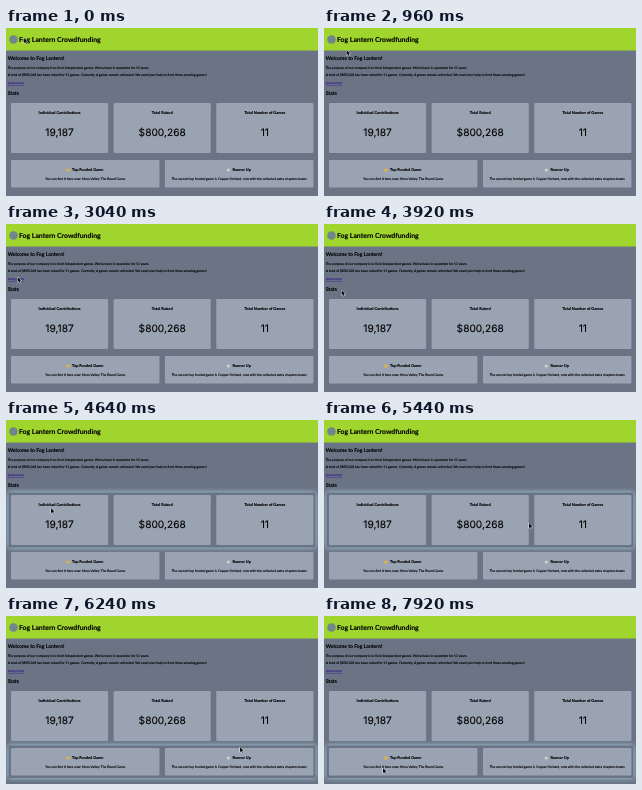
An HTML page that plays this animation: 312 by 168 pixels, repeating every 8000 ms.

```html
<!DOCTYPE html>
<html lang="en">
<head>
<meta charset="utf-8">
<title>Fog Lantern Crowdfunding</title>
<style>
html, body { margin: 0; width: 100%; height: 100%; overflow: hidden; background: #6a7485; }
svg { display: block; width: 100vw; height: 100vh; }
text {
  font-family: Lato, "Open Sans", sans-serif; font-size: 3.32px; text-rendering: geometricPrecision;
  fill: #000; stroke: #000; stroke-width: .12px;
}
.title { font-size: 6.88px; font-weight: 700; }
.h2 { font-size: 5.08px; font-weight: 700; }
.h3 { font-size: 3.92px; font-weight: 700; }
.num { font-family: Inter, sans-serif; font-size: 10.2px; }
.mid { text-anchor: middle; }
.link { fill: #3b1a90; stroke: #3b1a90; text-decoration: underline; }
.card { fill: #9aa3b2; }
.glow { fill: #add8e6; }
</style>
</head>
<body>
<svg viewBox="0 0 312 168">
  <defs>
    <filter id="blur" filterUnits="userSpaceOnUse" x="-12" y="50" width="336" height="130">
      <feGaussianBlur stdDeviation="2.6"/>
    </filter>
  </defs>
  <rect width="312" height="168" fill="#6a7485"/>
  <rect width="312" height="22.5" fill="#a0d52e"/>
  <circle cx="7.5" cy="11.5" r="4.3" fill="#71858c"/>
  <text class="title" x="13" y="13.8">Fog Lantern Crowdfunding</text>

  <text class="h2" x="1.7" y="31.9">Welcome to Fog Lantern!</text>
  <text x="1.7" y="41">The purpose of our company is to fund independent games. We've been in operation for 12 years.</text>
  <text x="1.7" y="48.3">A total of $800,268 has been raised for 11 games. Currently, 4 games remain unfunded. We need your help to fund these amazing games!</text>
  <text class="link" x="1.7" y="56">Learn more</text>
  <text class="h2" x="1.7" y="66.5">Stats</text>

  <g id="rows"></g>
  <path id="cursor" d="M0 0V5.2L1.2 4.1L2 6L2.9 5.6L2.1 3.8H3.7Z" fill="#08090b" stroke="#fff"
    stroke-width=".9" stroke-linejoin="round" paint-order="stroke"/>
</svg>
<script>
const byId = id => document.getElementById(id);
const LOOP = 8000, STEP = 80;
const LEFT = 5, WIDTH = 302.4, GAP = 5.5, MARGIN = 2.5;

const label = (cls, x, y, s) => `<text class="${cls} mid" x="${x}" y="${y}">${s}</text>`;

// A row of equal cards inside a box whose outer shadow can light up
function row(id, y, h, items, fill) {
  const w = (WIDTH - GAP * (items.length - 1)) / items.length;
  const top = y - MARGIN, bottom = y + h + MARGIN, right = 312 - MARGIN;
  const cards = items.map((item, i) => {
    const x = LEFT + i * (w + GAP);
    return `<rect class="card" x="${x}" y="${y}" width="${w}" height="${h}" rx="1.2"/>` + fill(x + w / 2, y, item);
  });
  return `<clipPath id="${id}Clip"><path clip-rule="evenodd"
      d="M0 ${top - 9}H312V${bottom + 9}H0ZM${MARGIN} ${top}V${bottom}H${right}V${top}Z"/></clipPath>
    <g clip-path="url(#${id}Clip)"><g id="${id}" filter="url(#blur)">
      <rect class="glow" x="${MARGIN}" y="${top}" width="${right - MARGIN}" height="${bottom - top}"/>
    </g></g>` + cards.join("");
}

const statText = (x, y, [name, value]) =>
  label("h3", x, y + 11.4, name) + label("num", x, y + 33.4, value);

const rankText = (x, y, [name, color, game]) =>
  `<circle cx="${x - name.length * 1.1 - 1}" cy="${y + 10.1}" r="1.7" fill="${color}"/>` +
  label("h3", x + 2.5, y + 11.4, name) + label("", x, y + 20.2, game);

byId("rows").innerHTML =
  row("stats", 75, 50, [
    ["Individual Contributions", "19,187"],
    ["Total Raised", "$800,268"],
    ["Total Number of Games", "11"]
  ], statText) +
  row("ranks", 132, 27.5, [
    ["Top Funded Game", "#e8b23a", "You can find it here now: Moss Valley: The Board Game"],
    ["Runner Up", "#c9ced4", "The second top funded game is Copper Orchard, now with the collected extra chapters boxes"]
  ], rankText);

// Where the cursor comes to rest; each move takes at most MOVE ms
const MOVE = 800;
const stops = [
  { t: 0, x: 18, y: 10 },
  { t: 1360, x: 27, y: 34 },
  { t: 2080, x: 12, y: 51 },
  { t: 3600, x: 10, y: 60 },
  { t: 4480, x: 45, y: 88 },
  { t: 5440, x: 205, y: 103 },
  { t: 6240, x: 234, y: 131 },
  { t: 7200, x: 87, y: 147 },
  { t: 7920, x: 59, y: 152 }
];

function ease(v) {
  v = Math.max(0, Math.min(1, v));
  return v * v * (3 - 2 * v);
}
const fade = (t, start) => ease((t - start) / 300);

function tipAt(t) {
  const i = stops.findIndex(s => s.t >= t);
  const b = stops[i], a = stops[Math.max(0, i - 1)];
  const start = Math.max(a.t, b.t - MOVE);
  const k = b === a ? 1 : ease((t - start) / (b.t - start));
  return [a.x + (b.x - a.x) * k, a.y + (b.y - a.y) * k];
}

function draw(now) {
  const t = Math.floor((now % LOOP) / STEP) * STEP;
  byId("cursor").setAttribute("transform", `translate(${tipAt(t)})`);
  byId("stats").setAttribute("opacity", fade(t, 4080) - fade(t, 5520));
  byId("ranks").setAttribute("opacity", fade(t, 5960));
}

const begin = performance.now();
function tick() {
  draw(performance.now() - begin);
  requestAnimationFrame(tick);
}
tick();
</script>
</body>
</html>
```
